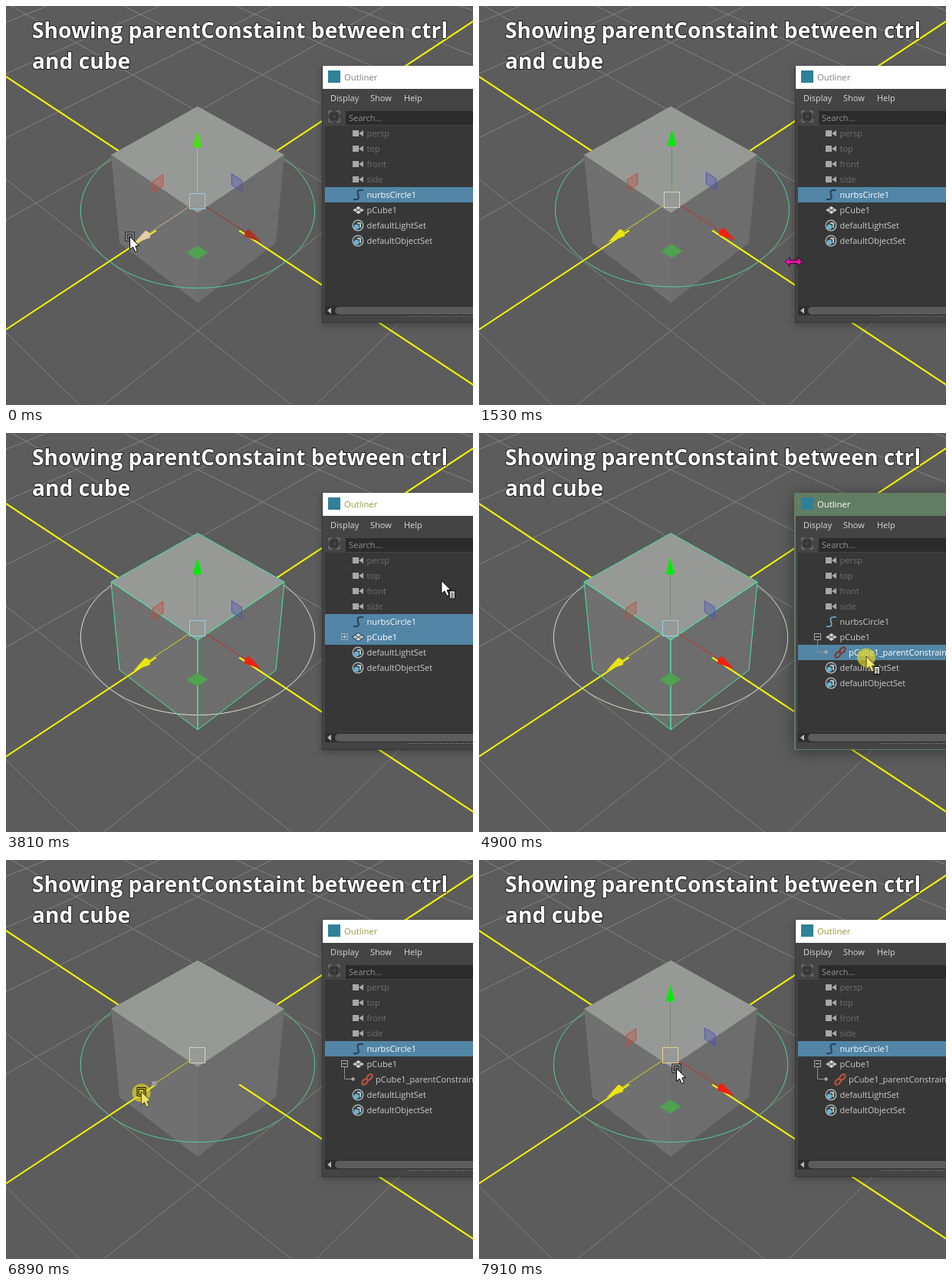
Animation, 609 px wide and 520 px high, one loop 8 s. Source, as an HTML page with a canvas:

```html
<!DOCTYPE html>
<html lang="en">
<head>
<meta charset="utf-8">
<style>
html, body { margin: 0; height: 100%; overflow: hidden; background: #5c5c5c; }
canvas { display: block; }
</style>
</head>
<body>
<canvas id="stage" width="609" height="520"></canvas>
<script>
const ctx = document.getElementById('stage').getContext('2d');
const LOOP = 8000;
const UI = '"Open Sans", "Noto Sans", sans-serif';

// Moments at which the interface changes, in ms.
const AT = { undo: 1700, pickCube: 2500, showCube: 2610, leave: 3200, link: 3430, expand: 4080,
  pickLink: 4900, hideCube: 5050, pickRing: 5850 };
const CLICKS = [AT.pickCube, AT.expand, AT.pickLink, AT.pickRing];
const DRAGS = [
  { start: 250, length: 1150, halfTurns: 3, size: .5, growth: .7 },
  { start: 6900, length: 590, halfTurns: 2, size: .46, growth: 0 }
];
// Places the pointer reaches, each with its arrival time.
const STOPS = [
  { time: 1400, x: 161.5, y: 300.5 }, { time: 1525, x: 410, y: 333.5 }, { time: 1710, x: 500, y: 264 },
  { time: 2840, x: 495, y: 191 }, { time: 3300, x: 640, y: 150 }, { time: 4060, x: 441, y: 267 },
  { time: 4390, x: 505, y: 291 }, { time: 5650, x: 355, y: 333 }, { time: 6290, x: 250.5, y: 301.5 },
  { time: 6650, x: 176.5, y: 302 }, { time: 7905, x: 257.5, y: 271.5 }
];
const MOVE = 420;

const within = (t, a, b) => t >= a && t < b;
const smooth = u => u * u * (3 - 2 * u);
const isDragging = t => DRAGS.some(d => within(t, d.start - 100, d.start + d.length));

function slideAt(t) {
  const drag = DRAGS.find(d => within(t, d.start, d.start + d.length));
  if (!drag) return within(t, 1400, AT.undo) ? -.018 : 0;
  const u = (t - drag.start) / drag.length;
  return -(drag.size + drag.growth * u) * Math.sin(Math.PI * drag.halfTurns * u);
}

function pointerAt(t) {
  const i = STOPS.findIndex(s => s.time > t);
  if (i <= 0) return STOPS.at(i);
  const a = STOPS[i - 1], b = STOPS[i], span = Math.min(MOVE, b.time - a.time);
  const u = smooth(Math.max(0, 1 - (b.time - t) / span));
  return { x: a.x + (b.x - a.x) * u, y: a.y + (b.y - a.y) * u };
}

// Perspective camera: world to stage.
function project(x, y, z) {
  const s = (x + z) / 2, w = 1 - .168 * s - .1026 * y;
  return [250 + 107.2 * (x - z) / w, 254.5 + (141 * s - 114.8 * y) / w];
}

function trace(points, closed) {
  ctx.beginPath();
  points.forEach(p => ctx.lineTo(p[0], p[1]));
  if (closed) ctx.closePath();
}
function fill(points, color) { trace(points, true); ctx.fillStyle = color; ctx.fill(); }
function stroke(points, color, width = 1, closed = false) {
  trace(points, closed);
  ctx.strokeStyle = color;
  ctx.lineWidth = width;
  ctx.stroke();
}
function rect(x, y, w, h, color) { ctx.fillStyle = color; ctx.fillRect(x, y, w, h); }
function box(x, y, r, color, width = 1) {
  ctx.strokeStyle = color;
  ctx.lineWidth = width;
  ctx.strokeRect(x - r, y - r, 2 * r, 2 * r);
}
function disc(x, y, r, color) {
  ctx.beginPath();
  ctx.arc(x, y, r, 0, 7);
  ctx.fillStyle = color;
  ctx.fill();
}
function diamond(x, y, rx, ry, color) {
  fill([[x - rx, y], [x, y - ry], [x + rx, y], [x, y + ry]], color);
}
function text(str, x, y, color, size = 11) {
  ctx.font = `${size}px ${UI}`;
  ctx.fillStyle = color;
  ctx.fillText(str, x, y);
}

function drawGrid() {
  const height = -.02, step = .985, near = 4, far = -6;
  for (const axis of [false, true])
    for (let n = far; n <= near; n++) {
      if (axis !== (n === 0)) continue;
      for (const swap of [false, true]) {
        const ends = [far, near].map(m => swap ? project(m * step, height, n * step) : project(n * step, height, m * step));
        stroke(ends, axis ? '#f8f800' : '#828282', axis ? 2 : 1);
      }
    }
}

function drawScene(t, z) {
  rect(0, 0, 609, 520, '#5c5c5c');
  const cubeZ = t > AT.link ? z : 0;
  const corner = (x, y, d) => project(x / 2, y / 2, d / 2 + cubeZ);
  const ringAt = y => [corner(-1, y, 1), corner(-1, y, -1), corner(1, y, -1), corner(1, y, 1)];
  const top = ringAt(1), bottom = ringAt(-1), middle = ringAt(0);
  const sideL = [top[0], top[3], bottom[3], bottom[0]], sideR = [top[3], top[2], bottom[2], bottom[3]];
  fill(sideL, '#707070');
  fill(sideR, '#6d6d6d');
  fill(top, '#979997');

  // The ground shows everywhere except behind the half of the cube above it.
  ctx.save();
  trace([top[0], top[1], top[2], middle[2], middle[3], middle[0]], true);
  ctx.rect(0, 0, 609, 520);
  ctx.clip('evenodd');
  drawGrid();
  const ring = Array.from({ length: 96 }, (_, i) => {
    const a = i * Math.PI / 48;
    return project(Math.cos(a), 0, z + Math.sin(a));
  });
  stroke(ring, within(t, AT.showCube, AT.pickRing) ? '#dcdcd4' : '#50d096', 1, true);
  ctx.restore();

  if (within(t, AT.showCube, AT.hideCube))
    [top, sideL, sideR].forEach(face => stroke(face, '#48e6a0', 1, true));
}

function drawArrow([dx, dy], lineColor, coneColor) {
  const at = (along, side = 0) => [dx * along - dy * side, dy * along + dx * side];
  const flare = 5.6 / Math.hypot(dx, dy);
  stroke([at(.14), at(.8)], lineColor);
  ctx.beginPath();
  ctx.moveTo(dx, dy);
  ctx.lineTo(...at(.78, flare));
  ctx.quadraticCurveTo(...at(.73), ...at(.78, -flare));
  ctx.fillStyle = coneColor;
  ctx.fill();
}

function drawPlane(a, b, color, alpha) {
  const at = (u, v) => [a[0] * u + b[0] * v, a[1] * u + b[1] * v];
  const lo = .54, hi = .7, corners = [at(lo, lo), at(hi, lo), at(hi, hi), at(lo, hi)];
  ctx.globalAlpha = alpha;
  fill(corners, color);
  ctx.globalAlpha = 1;
  stroke(corners, color, 1, true);
}

function drawManipulator(t, z, dragging) {
  const [cx, cy] = project(0, 0, z);
  const snap = v => Math.floor(v - .5) + .5;
  const x = [83, 53], y = [0, -92], zed = [-83, 55];
  let boxColor = '#92cfe0';
  if (dragging || within(t, 1400, AT.undo)) boxColor = '#cfcfc8';
  if (t > 7850) boxColor = '#ead28a';
  ctx.save();
  ctx.translate(snap(cx), snap(cy));
  if (dragging) {
    stroke([[-7, 5], [-57, 38]], '#d8d020');
    rect(-59, 34, 6, 6, '#a0a0a0');
  } else {
    const hover = t < 150;
    drawArrow(y, hover ? '#b4bcae' : '#70906c', hover ? '#48e010' : '#04e80a');
    drawArrow(x, hover ? '#a03024' : '#d02c1c', hover ? '#b03222' : '#f02010');
    drawArrow(zed, hover ? '#d0b08c' : '#dcd418', hover ? '#e3cfa5' : '#ece410');
    drawPlane(y, zed, '#c04e3a', .35);
    drawPlane(x, y, '#5056b0', .4);
    drawPlane(x, zed, '#4fa24e', 1);
  }
  box(0, 0, 10, boxColor);
  rect(-.5, -.5, 1, 1, boxColor);
  ctx.restore();
}

const icons = {
  camera(y) {
    rect(452, y - 4, 8, 8, '#a8a8a8');
    fill([[460, y], [466, y - 4], [466, y + 4]], '#a8a8a8');
  },
  curve(y, selected) {
    ctx.beginPath();
    ctx.moveTo(453, y + 6);
    ctx.bezierCurveTo(470, y + 8, 448, y - 8, 466, y - 6);
    ctx.strokeStyle = selected ? '#2c4358' : '#78b0d0';
    ctx.lineWidth = selected ? 2.2 : 1.6;
    ctx.stroke();
  },
  mesh(y, selected) {
    if (selected) diamond(459.5, y, 9, 6.2, '#2c4358');
    for (const side of [-1, 1]) {
      diamond(459.5 + 4 * side, y, 3.4, 2.3, '#c4c4c4');
      diamond(459.5, y + 2.7 * side, 3.4, 2.3, '#d8d8d8');
    }
  },
  set(y) {
    disc(459, y, 7.5, '#b8c0c4');
    disc(459, y, 6.2, '#3a454b');
    disc(457, y + 2, 3.2, '#68b4d0');
    stroke([[458, y - 3], [462, y - 3], [462, y + 3]], '#d8dee0', 1.6);
  },
  link(y, selected) {
    for (const d of [-3, 3]) {
      ctx.beginPath();
      ctx.ellipse(471 + d, y - d, 4.6, 2.7, -.8, 0, 7);
      ctx.strokeStyle = selected ? '#7c3a30' : '#b5533e';
      ctx.lineWidth = 2.2;
      ctx.stroke();
    }
  }
};

function drawList(t) {
  const expanded = t >= AT.expand;
  const rows = ['persp', 'top', 'front', 'side'].map(label => ({ icon: 'camera', label }));
  rows.push({ icon: 'curve', label: 'nurbsCircle1', selected: !expanded || t >= AT.pickRing });
  rows.push({ icon: 'mesh', label: 'pCube1', selected: within(t, AT.pickCube, AT.expand) });
  if (expanded) rows.push({ icon: 'link', label: 'pCube1_parentConstraint1', selected: t < AT.pickRing });
  rows.push({ icon: 'set', label: 'defaultLightSet' }, { icon: 'set', label: 'defaultObjectSet' });

  rect(416, 156, 193, 235, '#373737');
  rows.forEach(({ icon, label, selected }, i) => {
    const y = 166 + 20 * i;
    if (selected) rect(416, y - 10, 193, 20, '#5285a6');
    icons[icon](y, selected);
    text(label, icon === 'link' ? 482 : 470.5, y + 4, selected ? '#fff' : icon === 'camera' ? '#707070' : '#cacaca');
  });
  if (t >= AT.link) {
    box(441.5, 265.5, 4, '#a8a8a8');
    rect(439, 265, 5, 1, '#c8c8c8');
    if (!expanded) rect(441, 263, 1, 5, '#c8c8c8');
  }
  if (expanded) {
    stroke([[441.5, 270], [441.5, 285.5], [452, 285.5]], '#909090');
    disc(452.5, 285.5, 2.2, '#a8a8a8');
  }
}

function drawOutliner(t) {
  const active = within(t, AT.pickCube, AT.leave) || within(t, AT.expand, AT.pickRing);
  ctx.save();
  ctx.shadowColor = active ? 'rgba(0,0,0,.4)' : 'rgba(0,0,0,.28)';
  ctx.shadowBlur = active ? 18 : 9;
  ctx.shadowOffsetY = 3;
  rect(active ? 411 : 412, 78, 240, 335, active ? '#617d64' : '#383838');
  ctx.restore();
  rect(413, 78, 196, 30, active ? '#617d64' : '#ffffff');
  rect(420, 84, 16, 16, '#2f8099');
  text('Outliner', 441, 97, active ? '#fff' : t < AT.pickCube ? '#828080' : '#98983c', 11.3);

  rect(413, 108, 196, 304, '#444444');
  text('Display', 423, 124, '#d8d8d8');
  text('Show', 475, 124, '#d8d8d8');
  text('Help', 519, 124, '#d8d8d8');
  box(428, 144, 3.5, '#303030', 2);
  for (const sx of [-1, 1]) for (const sy of [-1, 1])
    stroke([[428 + 3 * sx, 144 + 7 * sy], [428 + 7 * sx, 144 + 7 * sy], [428 + 7 * sx, 144 + 3 * sy]], '#858585');
  rect(443, 137, 166, 18, '#2b2b2b');
  text('Search...', 447, 150, '#929292');
  drawList(t);

  rect(416, 391, 193, 12, '#2d2d2d');
  ctx.beginPath();
  ctx.roundRect(429, 392, 190, 10, 5);
  ctx.fillStyle = '#5c5c5c';
  ctx.fill();
  fill([[419, 397], [424, 393], [424, 401]], '#b8b8b8');
  for (let x = 524; x < 609; x += 3) rect(x, 404, 1, 1, '#909090');
}

function drawResizeCursor() {
  const half = [[-5, -2], [-5, -6], [-11, 0], [-5, 6], [-5, 2]];
  const shape = [...half, ...half.map(([x, y]) => [-x, -y])];
  fill(shape, '#f010b0');
  stroke(shape, '#281020', 1, true);
}

function drawCursor(t, z, dragging) {
  let { x, y } = pointerAt(t);
  if (dragging) {
    const [hx, hy] = project(0, 0, z), [ox, oy] = project(0, 0, 0);
    x += hx - ox;
    y += hy - oy;
  }
  const pressed = dragging || CLICKS.some(c => within(t, c, c + 100));
  ctx.save();
  ctx.translate(x, y);
  if (t < AT.undo && Math.abs(x - 410) < 6) {
    drawResizeCursor();
  } else {
    if (pressed) disc(0, 1.5, 12, 'rgba(225,212,28,.68)');
    if (x > 413) {
      rect(10, 13, 8, 11, '#111');
      rect(11, 14, 6, 9, '#eee');
      for (let i = 16; i < 23; i += 2) rect(12, i, 4, 1, '#333');
    } else {
      box(0, 0, 4.5, '#000', 3);
      box(0, 0, 4.5, pressed ? '#f0e040' : '#e8e8e8');
    }
    const arrow = [[0, 0], [0, 17], [4, 13.5], [7, 20], [10, 18.7], [7.3, 12.4], [12, 12]];
    fill(arrow, pressed ? '#ece46c' : '#fff');
    stroke(arrow, pressed ? '#4c4820' : '#000', 1, true);
  }
  ctx.restore();
}

function drawCaption() {
  ctx.save();
  ctx.font = `bold 28.2px ${UI}`;
  ctx.lineJoin = 'round';
  ctx.lineWidth = 2;
  ctx.strokeStyle = '#1c1c1c';
  ctx.fillStyle = '#fff';
  ['Showing parentConstaint between ctrl', 'and cube'].forEach((line, i) => {
    ctx.strokeText(line, 34, 42 + 40 * i);
    ctx.fillText(line, 34, 42 + 40 * i);
  });
  ctx.restore();
}

function draw() {
  const t = performance.now() % LOOP;
  const z = slideAt(t), dragging = isDragging(t);
  drawScene(t, z);
  drawManipulator(t, z, dragging);
  drawCaption();
  drawOutliner(t);
  drawCursor(t, z, dragging);
  requestAnimationFrame(draw);
}
draw();
</script>
</body>
</html>
```
